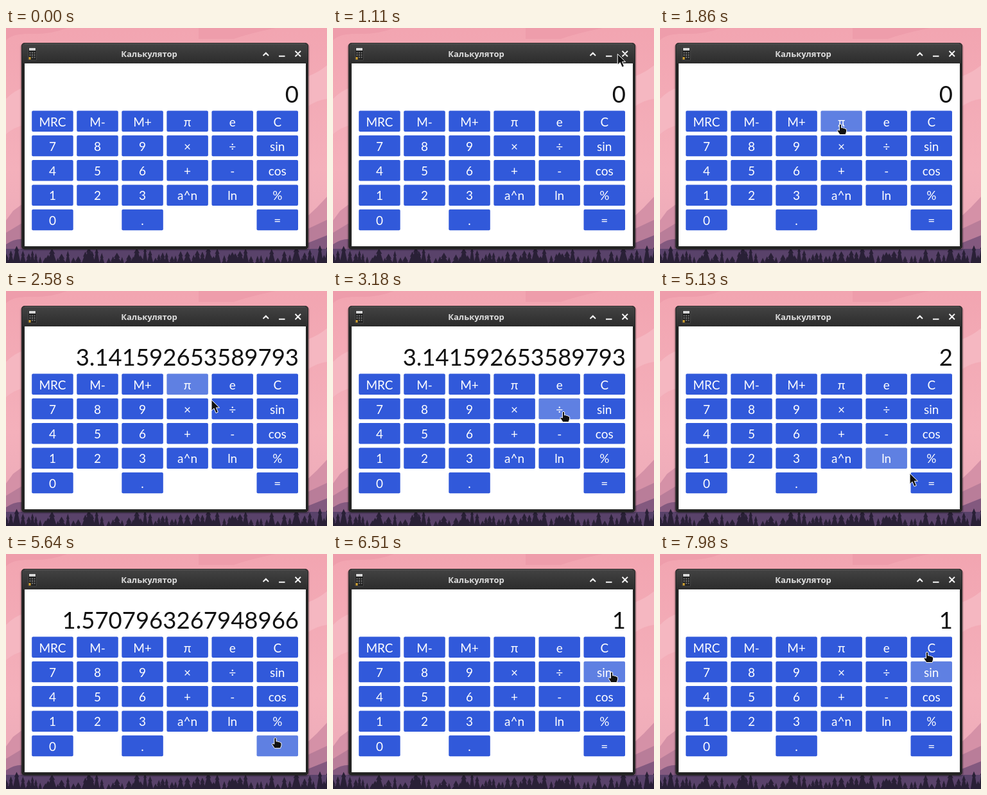
Animation of 500x365 px, one loop 8 s. Source, as an HTML page:

```html
<!DOCTYPE html>
<html lang="ru">
<head>
<meta charset="utf-8">
<title>Калькулятор</title>
<style>
  html, body { margin: 0; width: 100%; height: 100%; overflow: hidden; background: #f3abb6; }
  svg { display: block; }
  text { white-space: pre; }
  .key { font: 19px Lato, "Noto Sans", sans-serif; fill: #fff; text-anchor: middle; }
  #display { font: 36.5px Lato, sans-serif; fill: #111; text-anchor: end; }
  #title { font: bold 13px "Noto Sans", "Open Sans", sans-serif; fill: #dedede; text-anchor: middle; }
</style>
</head>
<body>
<svg width="500" height="365" viewBox="0 0 500 365">
  <defs>
    <linearGradient id="sky" x2="0" y2="1">
      <stop offset="0" stop-color="#f2a5b1"/>
      <stop offset=".6" stop-color="#f4b0bb"/>
      <stop offset="1" stop-color="#e9a9b8"/>
    </linearGradient>
    <linearGradient id="bar" x2="0" y2="1">
      <stop offset="0" stop-color="#434343"/>
      <stop offset="1" stop-color="#2c2c2c"/>
    </linearGradient>
  </defs>

  <rect width="500" height="365" fill="url(#sky)"/>
  <path d="M0 0H95Q70 10 40 9T0 19Z M300 0H420Q380 8 355 17H300Z" fill="#ee9dab"/>
  <path d="M0 110Q14 96 30 92V150Q12 154 0 165Z M470 75Q485 70 500 58V110Q484 112 470 122Z" fill="#f5b7c1"/>
  <path d="M0 299L11 284L30 270V365H0Z M470 292L484 279L500 262V365H470Z" fill="#d591a7"/>
  <path d="M0 318L30 300V365H0Z M470 312L500 298V365H470Z" fill="#b97d99"/>
  <path d="M0 336Q14 326 30 328V365H0Z M470 334L500 322V365H470Z" fill="#83597f"/>
  <rect y="343" width="500" height="22" fill="#59426a"/>
  <path id="trees" fill="#292036"/>

  <rect x="22" y="24" width="451" height="322" rx="6" fill="#000" opacity=".18"/>
  <rect x="24" y="23" width="447" height="321" rx="5" fill="#242424"/>
  <path d="M25 55V29Q25 24 30 24H465Q470 24 470 29V55Z" fill="url(#bar)"/>
  <path d="M29 24.5H466" stroke="#5a5a5a"/>
  <rect x="29" y="55" width="438" height="284" fill="#fff"/>

  <rect x="34.5" y="30" width="13" height="20" rx="1" fill="#222" stroke="#555" stroke-width=".7"/>
  <rect x="36" y="31" width="10" height="4" fill="#d8d8d8"/>
  <path d="M36.5 38.5H46M36.5 42H46M40 45.5H46" stroke="#777" stroke-width="2" stroke-dasharray="2 1.5"/>
  <rect x="35.5" y="45" width="3" height="4" fill="#d5a532"/>
  <text id="title" x="223" y="45">Калькулятор</text>
  <path d="M400.5 43L404.8 38.7L409 43M425 43.7H434.5M450.5 35.7L459 44.2M459 35.7L450.5 44.2"
        fill="none" stroke="#f4f4f4" stroke-width="2"/>

  <text id="display" x="456" y="116">0</text>
  <g id="keys"></g>

  <path id="arrow" d="M0 0V17L4 13.3L7 20.5L10.3 19.1L7.3 12.2H12.5Z"
        fill="#111" stroke="#fff" stroke-width="1"/>
  <path id="hand" d="M-1.6 0Q0 -1.5 1.6 0V5Q3.5 4 4.5 5.5Q6.3 4.8 7.2 6.4Q9.5 6 9.6 8.4V11L8 15.5H-1L-5 9.5Q-5 7.2 -1.6 9Z"
        fill="#111" stroke="#fff" stroke-width="1"/>
</svg>
<script>
const LOOP = 8000, STEP = 30, HOVER_LAG = 130;
const $ = id => document.getElementById(id);
const NS = 'http://www.w3.org/2000/svg';

function add(parent, tag, attrs, text = '') {
  const el = document.createElementNS(NS, tag);
  for (const name in attrs) el.setAttribute(name, attrs[name]);
  el.textContent = text;
  return parent.appendChild(el);
}

// Seeded row of firs along the bottom edge
let seed = 11;
const rand = () => (seed = seed * 16807 % 2147483647) / 2147483647;
let firs = '';
for (let x = -4; x < 506; x += 4 + rand() * 7) {
  const edge = x < 30 || x > 465 ? 10 : 0;
  const top = 340 + rand() * 17 - edge * rand(), w = 4 + rand() * 4;
  firs += `M${x} ${top}l${w * .6} 8h-${w * .25}L${x + w} 366H${x - w}L${x - w * .35} ${top + 8}h-${w * .25}Z`;
}
$('trees').setAttribute('d', firs);

const rows = [
  ['MRC', 'M-', 'M+', 'π', 'e', 'C'],
  ['7', '8', '9', '×', '÷', 'sin'],
  ['4', '5', '6', '+', '-', 'cos'],
  ['1', '2', '3', 'a^n', 'ln', '%'],
  ['0', '', '.', '', '', '=']
];
const W = 64.5, H = 32.5;
const keys = [];
rows.forEach((row, r) => row.forEach((label, c) => {
  if (!label) return;
  const x = 40.2 + c * 70.06, y = 128.5 + r * 38.3;
  const box = add($('keys'), 'rect', { x, y, width: W, height: H, rx: 2 });
  add($('keys'), 'text', { class: 'key', x: x + W / 2, y: y + 24 }, label);
  keys.push({ x, y, box });
}));

// Pointer moves: start, end, target x, y and an optional bend
const moves = [
  [780, 1770, 281, 150],
  [2190, 2970, 359, 188],
  [3270, 4140, 146, 262],
  [4680, 5400, 418, 296, 414, 274],
  [5580, 5910, 434, 184],
  [7530, 7650, 430, 180],
  [7770, 8010, 415.4, 151.8]
];

function pointer(t) {
  if (t < 810) return null;
  let x = 500, y = 2;
  for (const [t0, t1, tx, ty, bx = (x + tx) / 2, by = (y + ty) / 2] of moves) {
    if (t < t0) break;
    const u = Math.min(1, (t - t0) / (t1 - t0));
    const s = u * u * (3 - 2 * u);
    const bend = (a, b, c) => (1 - s) ** 2 * a + 2 * s * (1 - s) * b + s * s * c;
    x = bend(x, bx, tx);
    y = bend(y, by, ty);
  }
  return { x, y };
}

const keyAt = p => p && keys.find(k => p.x >= k.x && p.x <= k.x + W && p.y >= k.y && p.y <= k.y + H);

const readings = [
  [0, '0'], [1980, '3.141592653589793'], [4350, '2'],
  [5520, '1.5707963267948966'], [6180, '1']
];

function draw(t) {
  const p = pointer(t), hot = keyAt(pointer(t - HOVER_LAG)), over = keyAt(p);
  for (const k of keys) k.box.setAttribute('fill', k === hot ? '#5f80e2' : '#3159da');
  $('display').textContent = readings.filter(([from]) => t >= from).pop()[1];
  const place = (id, shown) => {
    $(id).setAttribute('visibility', shown ? 'visible' : 'hidden');
    if (shown) $(id).setAttribute('transform', `translate(${p.x} ${p.y})`);
  };
  place('hand', p && over);
  place('arrow', p && !over);
}

const start = performance.now();
function tick() {
  const t = (performance.now() - start) % LOOP;
  draw(Math.floor(t / STEP) * STEP);
  requestAnimationFrame(tick);
}
tick();
</script>
</body>
</html>
```
